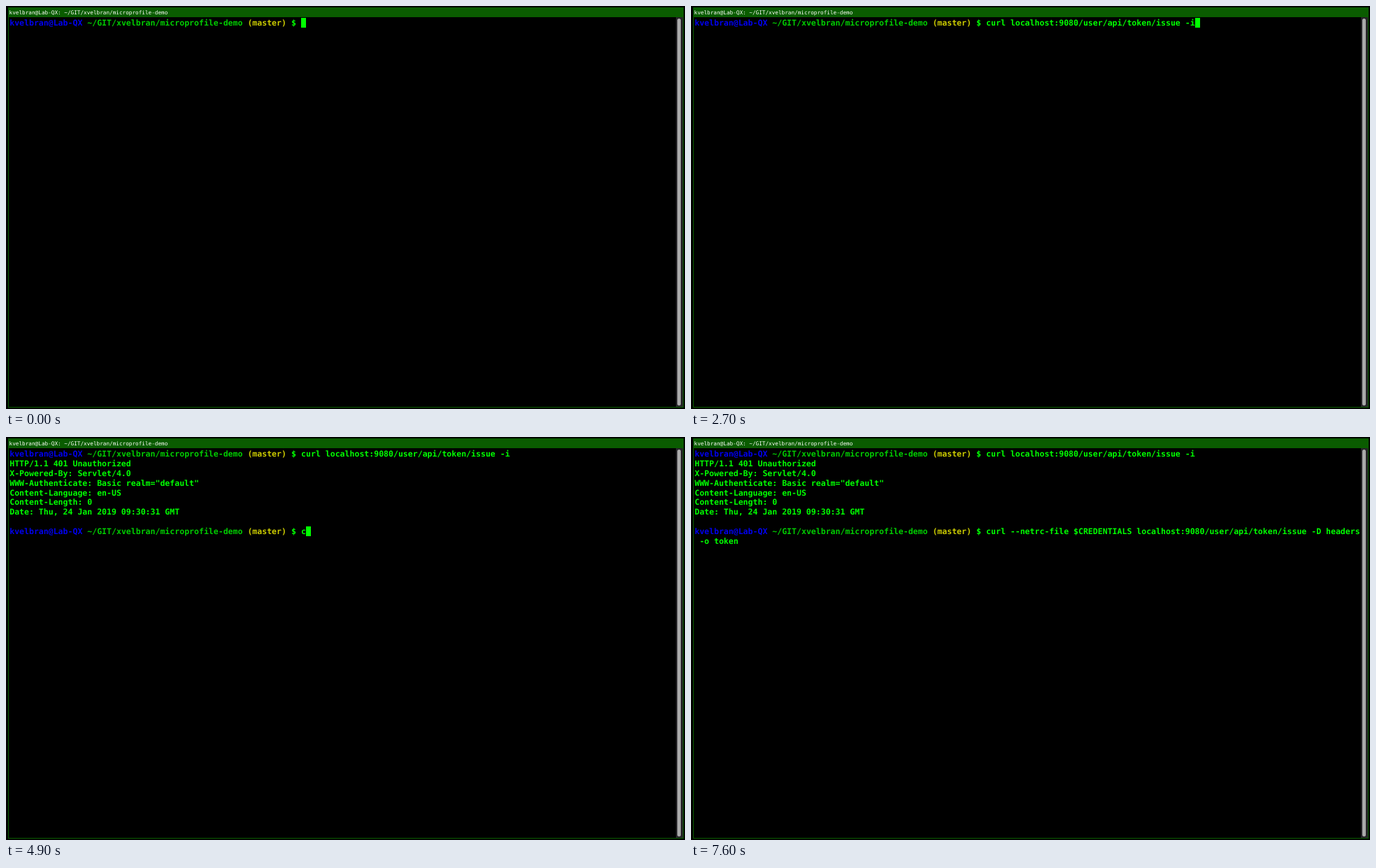
An HTML page for the animation above (8000 ms loop, 971 px wide and 577 px high).

```html
<!DOCTYPE html>
<html lang="en">
<head>
<meta charset="utf-8">
<title>Terminal session</title>
<style>
  html, body { margin: 0; width: 100%; height: 100%; overflow: hidden; background: #000; }
  svg { display: block; width: 971px; height: 577px; }
  text {
    font: bold 11.54px "DejaVu Sans Mono", monospace;
    fill: #0f0;
    white-space: pre;
    text-rendering: geometricPrecision;
  }
  .title { font-weight: normal; font-size: 7.7px; fill: #fff; }
  .user { fill: #00e; }
  .path { fill: #00cd00; }
  .branch { fill: #cdcd00; }
</style>
</head>
<body>
<svg viewBox="0 0 971 577" xmlns="http://www.w3.org/2000/svg">
  <rect width="971" height="577"/>
  <rect x="3.5" y="2.5" width="965" height="572" fill="none" stroke="#0a5c00"/>
  <rect x="3" y="2" width="966" height="14" fill="#0a5c00"/>
  <text class="title" x="4.6" y="11.6">kvelbran@Lab-QX: ~/GIT/xvelbran/microprofile-demo</text>
  <rect x="958" y="16" width="10" height="558" fill="#262428"/>
  <rect x="960" y="18" width="5" height="554" rx="2.5" fill="#a9a9a9"/>

  <text id="prompt" x="5.2" y="28" xml:space="preserve"><tspan class="user">kvelbran@Lab-QX</tspan> <tspan class="path">~/GIT/xvelbran/microprofile-demo</tspan> <tspan class="branch">(master)</tspan> $ </text>
  <use id="prompt2" href="#prompt" y="111.17"/>
  <g id="output"></g>
  <g id="typed"></g>
  <rect id="cursor" width="7" height="14" fill="#0f0"/>
</svg>
<script>
const LOOP = 8000, COLS = 137, PROMPT = 60;
const LEFT = 5.2, TOP = 17, CELL_W = 6.948, CELL_H = 13.896, BASE = 11;

const first = "curl localhost:9080/user/api/token/issue -i";
const second = "curl --netrc-file $CREDENTIALS localhost:9080/user/api/token/issue -D headers -o token";
const reply = [
  "HTTP/1.1 401 Unauthorized",
  "X-Powered-By: Servlet/4.0",
  'WWW-Authenticate: Basic realm="default"',
  "Content-Language: en-US",
  "Content-Length: 0",
  "Date: Thu, 24 Jan 2019 09:30:31 GMT"
];

// [start ms, characters typed]; -1 means the prompt is not there yet
const firstKeys = [[0, 0], [600, 1], [700, 2], [800, 3], [900, 4], [1000, 5], [1400, first.length]];
const secondKeys = [[0, -1], [3300, 0], [4900, 1], [5100, 2], [5300, 4], [5500, 5],
  [6500, 6], [6700, 7], [7000, second.length]];
const hidden = [[200, 600], [2000, 2700], [3900, 4400], [6100, 6500], [7600, LOOP]];
const ENTER = 3200;

const $ = id => document.getElementById(id);
const x = col => LEFT + col * CELL_W;
const y = row => TOP + row * CELL_H;
const show = (el, on) => el.setAttribute("visibility", on ? "visible" : "hidden");
const count = (keys, t) => keys.filter(k => k[0] <= t).pop()[1];

function addLine(parent, col, row, str = "") {
  const el = document.createElementNS("http://www.w3.org/2000/svg", "text");
  el.setAttribute("x", x(col));
  el.setAttribute("y", y(row) + BASE);
  el.textContent = str;
  return parent.appendChild(el);
}

reply.forEach((str, i) => addLine($("output"), 0, i + 1, str));
const line1 = addLine($("typed"), PROMPT, 0);
const line2 = addLine($("typed"), PROMPT, 8);
const wrapped = addLine($("typed"), 0, 9);

function placeCursor(col, row) {
  $("cursor").setAttribute("x", Math.round(x(col % COLS)));
  $("cursor").setAttribute("y", Math.round(y(row + Math.floor(col / COLS))));
}

function draw(t) {
  const n1 = count(firstKeys, t), n2 = count(secondKeys, t);
  const text2 = second.slice(0, Math.max(n2, 0));
  line1.textContent = first.slice(0, n1);
  line2.textContent = text2.slice(0, COLS - PROMPT);
  wrapped.textContent = text2.slice(COLS - PROMPT);

  show($("output"), t >= ENTER);
  show($("prompt2"), n2 >= 0);
  show($("cursor"), !hidden.some(([a, b]) => t >= a && t < b));

  if (t < ENTER) placeCursor(PROMPT + n1, 0);
  else placeCursor(n2 < 0 ? 0 : PROMPT + n2, 8);
}

const start = performance.now();
function tick() {
  draw((performance.now() - start) % LOOP);
  requestAnimationFrame(tick);
}
tick();
</script>
</body>
</html>
```
